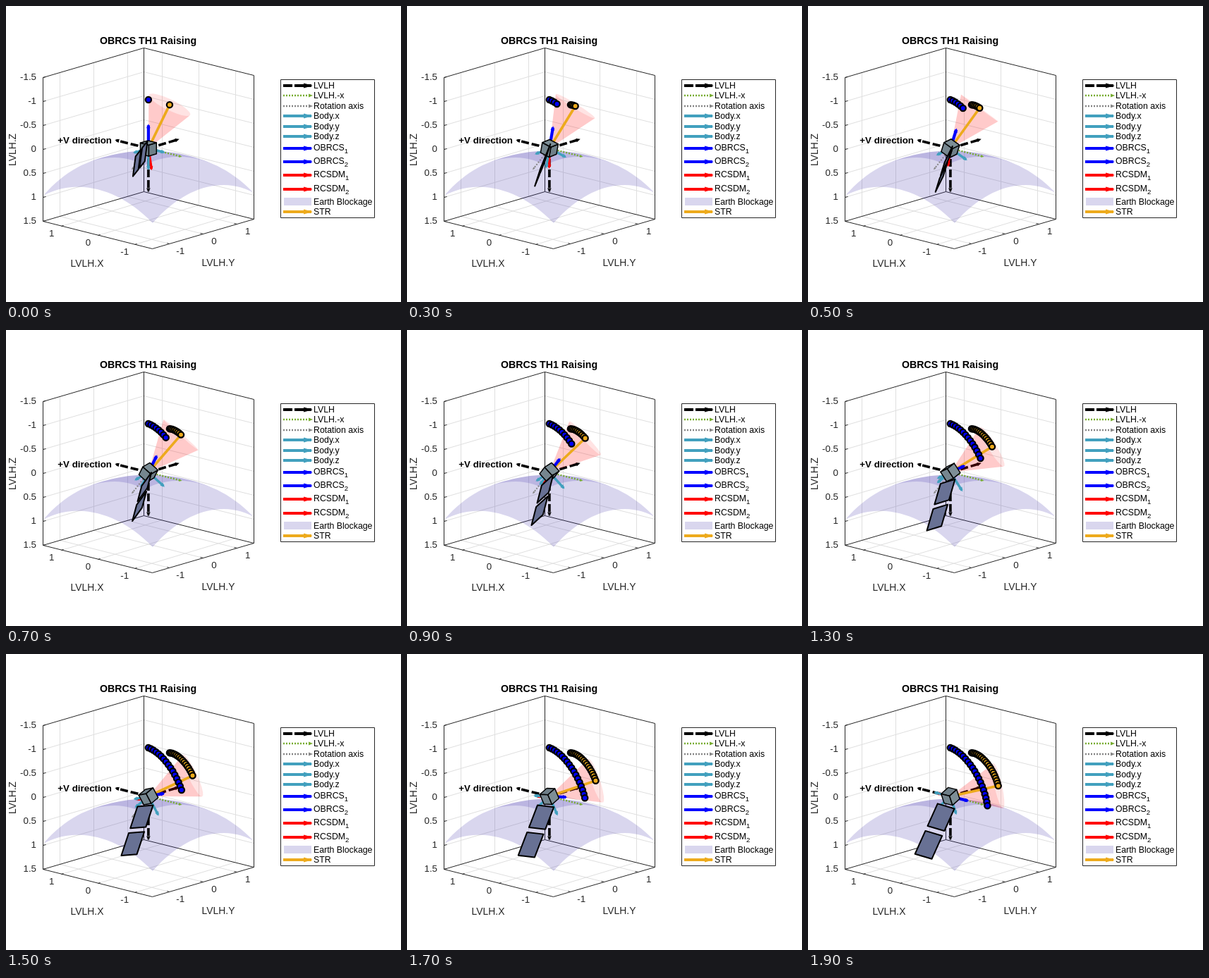
Write an HTML page with a canvas that moves like this. It is 560 by 420 pixels and loops after 2.1 s.

```html
<!DOCTYPE html>
<html lang="en">
<head>
<meta charset="utf-8">
<title>Attitude manoeuvre</title>
<style>
  html, body { margin: 0; width: 100%; height: 100%; overflow: hidden; background: #fff; }
  canvas, svg { position: absolute; left: 0; top: 0; width: 560px; height: 420px; }
  text { font-family: "Liberation Sans", Arial, sans-serif; fill: #262626; }
</style>
</head>
<body>
<canvas width="560" height="420"></canvas>
<svg viewBox="0 0 560 420"></svg>
<script>
const ctx = document.querySelector('canvas').getContext('2d');
const svg = document.querySelector('svg');
const STEP = 100, LAST = 19, LOOP = 2100;
const TEAL = '#42a0be', BLUE = '#0000ff', RED = '#ff0000', ORANGE = '#edaa1c',
      INK = '#262626', GREEN = '#77ac30', GRAY = '#858585', EARTH = 'rgba(65,50,170,.2)';

// Vectors, axonometric projection, rotation about the slew axis
const dot = (a, b) => a[0] * b[0] + a[1] * b[1] + a[2] * b[2];
const cross = (a, b) => [a[1] * b[2] - a[2] * b[1], a[2] * b[0] - a[0] * b[2], a[0] * b[1] - a[1] * b[0]];
const scale = (a, k) => a.map(v => v * k);
const add = (...vs) => [0, 1, 2].map(i => vs.reduce((sum, v) => sum + v[i], 0));
const project = ([x, y, z]) => [201.9 - 51.7 * x + 47.7 * y, 202 - 13 * x - 14.3 * y + 68 * z];
const VIEWER = [-3244, -3516, -1359];
const AXIS = [-0.1955, 0.961, -0.1955];
const SLEW = 92.3 * Math.PI / 180;

function rotate(v, angle) {
  const c = Math.cos(angle), s = Math.sin(angle);
  return add(scale(v, c), scale(cross(AXIS, v), s), scale(AXIS, dot(AXIS, v) * (1 - c)));
}

// Body-fixed geometry in the starting attitude
const yaw = 30.5 * Math.PI / 180;
const BODY = [[-1, 0, 0], [0, -1, 0], [0, 0, 1]];
const WING = [-Math.sin(yaw), -Math.cos(yaw), 0];
const CHORD = [0.13 * Math.cos(yaw), -0.13 * Math.sin(yaw), 1];
const TRACKER = [0, 0.63, -0.777];
const CONE_U = [1, 0, 0], CONE_V = [0, 0.777, 0.63], CONE_R = 0.465;

function line(a, b, color, width = 1, dash = []) {
  ctx.strokeStyle = color;
  ctx.lineWidth = width;
  ctx.setLineDash(dash);
  ctx.beginPath();
  ctx.moveTo(...a);
  ctx.lineTo(...b);
  ctx.stroke();
  ctx.setLineDash([]);
}
const line3 = (a, b, ...style) => line(project(a), project(b), ...style);

function arrow(a, b, color, width = 3, dash = [], head = 6, half = 2.8) {
  const len = Math.hypot(b[0] - a[0], b[1] - a[1]);
  const ux = (b[0] - a[0]) / len, uy = (b[1] - a[1]) / len;
  const x = b[0] - ux * head, y = b[1] - uy * head;
  line(a, [b[0] - ux * 2, b[1] - uy * 2], color, width, dash);
  ctx.fillStyle = color;
  ctx.beginPath();
  ctx.moveTo(...b);
  ctx.lineTo(x - uy * half, y + ux * half);
  ctx.lineTo(x + uy * half, y - ux * half);
  ctx.fill();
}
const ray = (v, ...style) => arrow(project([0, 0, 0]), project(v), ...style);

function addPolygon(path, points) {
  points.forEach((p, i) => i ? path.lineTo(...p) : path.moveTo(...p));
  path.closePath();
}

// Splits a surface into its near and far sheets, one path for each
function sheets(polygons) {
  const pair = [new Path2D(), new Path2D()];
  for (const points of polygons) {
    const area = points.reduce((sum, p, i) => {
      const q = points[(i + 1) % points.length];
      return sum + p[0] * q[1] - q[0] * p[1];
    }, 0);
    addPolygon(pair[area > 0 ? 0 : 1], points);
  }
  return pair;
}

function face(points, fill, width) {
  const path = new Path2D();
  addPolygon(path, points.map(project));
  ctx.fillStyle = fill;
  ctx.fill(path);
  ctx.strokeStyle = '#000';
  ctx.lineWidth = width;
  ctx.lineJoin = 'round';
  ctx.stroke(path);
}

const earth = (() => {
  const n = 24, R = 3.287, top = 0.18, quads = [];
  const at = (i, j) => {
    const x = 3 * i / n - 1.5, y = 3 * j / n - 1.5;
    return project([x, y, top + R - Math.sqrt(R * R - x * x - y * y)]);
  };
  for (let i = 0; i < n; i++)
    for (let j = 0; j < n; j++)
      quads.push([at(i, j), at(i + 1, j), at(i + 1, j + 1), at(i, j + 1)]);
  return sheets(quads);
})();

function drawAxes() {
  const m = 1.5, t = 0.07, grid = '#dfdfdf';
  const snap = p => project(p).map(v => Math.floor(v) + 0.5);
  const edge = (a, b, color) => line(snap(a), snap(b), color);
  for (const k of [-1, 0, 1]) {
    edge([m, k, -m], [m, k, m], grid);
    edge([k, m, -m], [k, m, m], grid);
    edge([-m, k, m], [m, k, m], grid);
    edge([k, -m, m], [k, m, m], grid);
  }
  for (let z = -1; z <= 1; z += 0.5) {
    edge([m, -m, z], [m, m, z], grid);
    edge([m, m, z], [-m, m, z], grid);
  }
  for (const z of [-m, m]) {
    edge([m, -m, z], [m, m, z], INK);
    edge([m, m, z], [-m, m, z], INK);
  }
  edge([m, -m, m], [-m, -m, m], INK);
  edge([-m, -m, m], [-m, m, m], INK);
  for (const [x, y] of [[m, -m], [m, m], [-m, m]]) edge([x, y, -m], [x, y, m], INK);
  for (const k of [-1, 0, 1]) {
    edge([k, -m, m], [k, -m + t, m], INK);
    edge([-m, k, m], [-m + t, k, m], INK);
  }
  for (let z = -m; z <= m; z += 0.5) edge([m, -m, z], [m, -m + t, z], INK);
}

const LEGEND = [
  [113, 'LVLH', '#000', 3.8, [13, 3]],
  [127, 'LVLH.-x', GREEN, 2.6, [2, 2]],
  [142, 'Rotation axis', GRAY, 2.6, [2, 2]],
  [156, 'Body.x', TEAL],
  [171, 'Body.y', TEAL],
  [185, 'Body.z', TEAL],
  [202, 'OBRCS', BLUE, 4, [], 1],
  [221, 'OBRCS', BLUE, 4, [], 2],
  [240, 'RCSDM', RED, 4, [], 1],
  [260, 'RCSDM', RED, 4, [], 2],
  [278, 'Earth Blockage', EARTH],
  [292, 'STR', ORANGE]
];

function drawLegend() {
  ctx.strokeStyle = INK;
  ctx.lineWidth = 1;
  ctx.strokeRect(389.5, 104.5, 133, 196);
  for (const [y, , color, width = 4, dash = []] of LEGEND) {
    if (color === EARTH) {
      ctx.fillStyle = EARTH;
      ctx.fillRect(394, 272, 39, 11);
    } else {
      const [head, half] = width < 3 ? [6, 2.4] : [13, 3.6];
      arrow([393, y], [435, y], color, width, dash, head, half);
    }
  }
}

function drawCone(angle) {
  const n = 20, apex = project([0, 0, 0]);
  const rim = i => {
    const a = 2 * Math.PI * i / n;
    return project(rotate(add(TRACKER, scale(CONE_U, CONE_R * Math.cos(a)),
                              scale(CONE_V, CONE_R * Math.sin(a))), angle));
  };
  ctx.fillStyle = 'rgba(255,0,0,.11)';
  const triangles = Array.from({ length: n }, (_, i) => [apex, rim(i), rim(i + 1)]);
  for (const sheet of sheets(triangles)) ctx.fill(sheet);
}

function drawSatellite(angle) {
  const h = 0.115, axes = BODY.map(v => rotate(v, angle));
  const minus = a => scale(a, -1);
  axes.forEach((axis, i) => {
    const n = scale(axis, dot(axis, VIEWER) > 0 ? h : -h);
    const u = scale(axes[(i + 1) % 3], h), v = scale(axes[(i + 2) % 3], h);
    face([add(n, u, v), add(n, u, minus(v)), add(n, minus(u), minus(v)), add(n, minus(u), v)],
         ['#6f7f88', '#76868f', '#7d8e96'][i], 1.5);
  });
  const wing = rotate(WING, angle), chord = rotate(CHORD, angle);
  for (const [near, far] of [[0.22, 0.72], [0.83, 1.35]]) {
    const corner = (d, w) => add(scale(wing, d), scale(chord, w));
    face([corner(near, -0.21), corner(far, -0.21), corner(far, 0.21), corner(near, 0.21)], '#687194', 2);
  }
}

function drawTrail(v, step, fill) {
  ctx.fillStyle = fill;
  ctx.strokeStyle = '#000';
  ctx.lineWidth = 2.3;
  for (let i = 0; i <= step; i++) {
    ctx.beginPath();
    ctx.arc(...project(rotate(v, SLEW * i / LAST)), 4.1, 0, 2 * Math.PI);
    ctx.fill();
    ctx.stroke();
  }
}

function draw(step) {
  const angle = SLEW * step / LAST;
  const body = (v, k) => scale(rotate(v, angle), k);
  ctx.fillStyle = '#fff';
  ctx.fillRect(0, 0, 560, 420);
  drawAxes();
  ctx.fillStyle = EARTH;
  for (const sheet of earth) ctx.fill(sheet);

  for (const v of [[0.92, 0, 0], [0, 0.92, 0], [0, 0, 0.92]]) ray(v, '#000', 3.6, [11, 4]);
  ray([-0.92, 0, 0], GREEN, 2.4, [2, 2], 4, 1.8);
  arrow(project([0, 0, 0]), [178, 232.5], GRAY, 2, [2, 2], 4, 1.5);
  drawCone(angle);
  ray(body([-0.1, 0.1, 1], 0.46), RED, 3.6);
  for (const v of BODY) ray(body(v, 0.46), TEAL, 3.4);
  line3([0, 0, 0], body(TRACKER, 1), ORANGE, 3.6);
  ray(body([0, 0, -1], 0.51), BLUE, 4.2);
  drawSatellite(angle);
  drawTrail([0, 0, -1.015], step, BLUE);
  drawTrail(TRACKER, step, ORANGE);
  drawLegend();
}

function label(content, x, y, size = 13.33, attrs = {}) {
  const node = document.createElementNS(svg.namespaceURI, 'text');
  const all = { x, y, 'font-size': size, 'text-anchor': 'middle', ...attrs };
  for (const key in all) node.setAttribute(key, all[key]);
  node.textContent = content;
  svg.append(node);
  return node;
}

function writeLabels() {
  const bold = { 'font-weight': 'bold', style: 'fill:#000' };
  label('OBRCS TH1 Raising', 201.5, 54, 14.2, bold);
  label('+V direction', 150, 195, 13.33, { ...bold, 'text-anchor': 'end' });
  for (let i = 0; i < 7; i++)
    label(String(i / 2 - 1.5), 43, 105 + 34 * i, 13.33, { 'text-anchor': 'end' });
  for (const k of [-1, 0, 1]) {
    label(String(k), 116.5 - 51.7 * k, 340 - 13 * k);
    label(String(k), 295 + 47.7 * k, 338 - 14.3 * k);
  }
  label('LVLH.X', 115, 369.5, 13.9);
  label('LVLH.Y', 301, 368.5, 13.9);
  label('LVLH.Z', 0, 0, 13.9, { transform: 'translate(13.5 204) rotate(-90)' });
  for (const [y, name, , , , index] of LEGEND) {
    const node = label(name, 436, y + (index ? 3 : 4), 12.3, { 'text-anchor': 'start', style: 'fill:#000' });
    if (!index) continue;
    const sub = document.createElementNS(svg.namespaceURI, 'tspan');
    sub.setAttribute('dy', 4);
    sub.setAttribute('font-size', 9.6);
    sub.textContent = index;
    node.append(sub);
  }
}

writeLabels();
const start = performance.now();
let shown = -1;
function tick(now) {
  const time = Math.max(0, now - start) % LOOP;
  const step = Math.min(LAST, Math.floor(time / STEP));
  if (step !== shown) draw(shown = step);
  requestAnimationFrame(tick);
}
tick(start);
</script>
</body>
</html>
```
